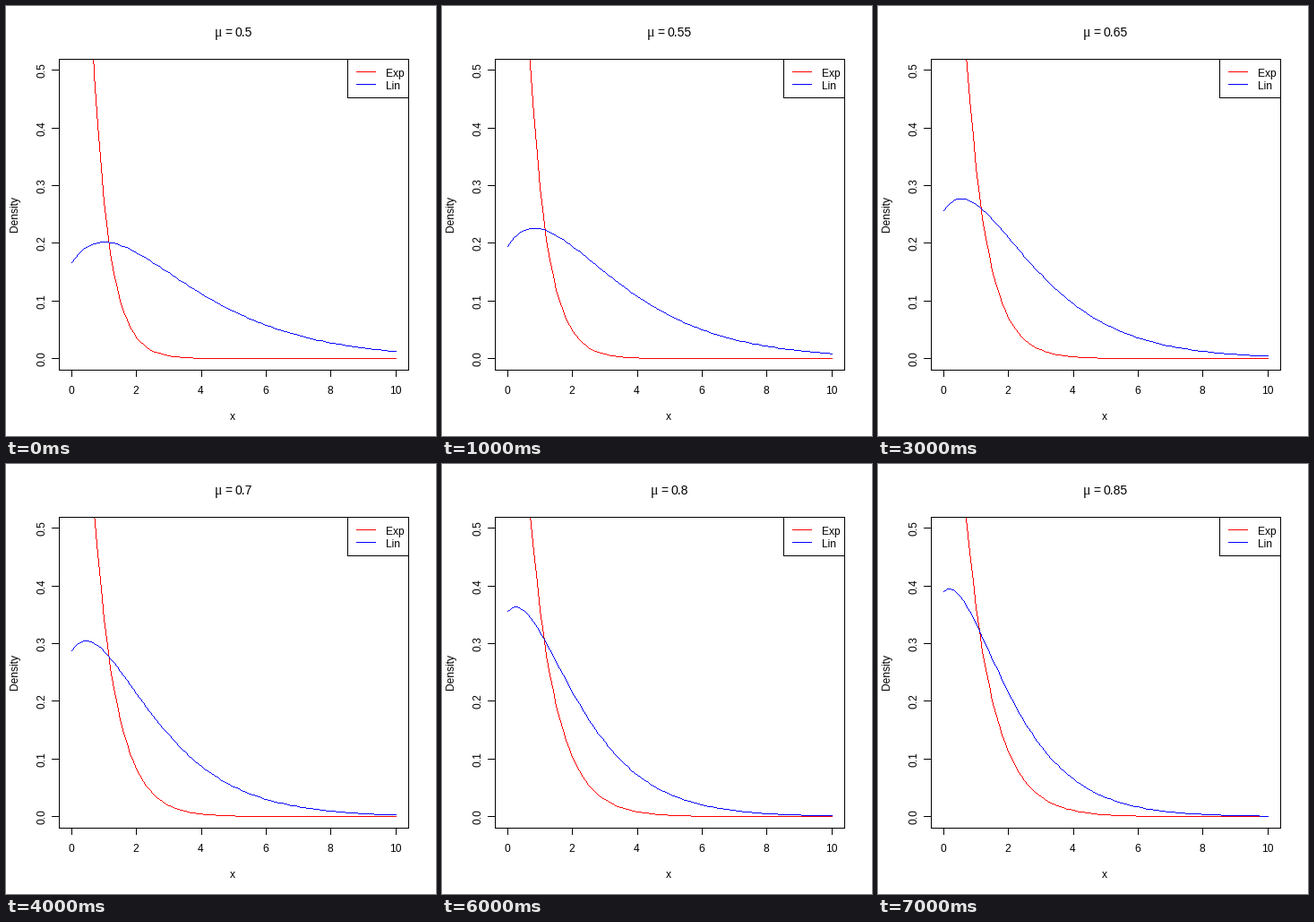
These frames come from a looping animation (480x480 px, 8 s). A matplotlib script:

```python
import numpy as np
import matplotlib.pyplot as plt
from matplotlib.animation import FuncAnimation
from matplotlib.patches import PathPatch, Rectangle
from matplotlib.path import Path

SIZE = 480
LEFT, RIGHT, TOP, BOTTOM = 59, 449, 59, 406
MUS = [0.5 + 0.05 * k for k in range(8)]
X = np.linspace(0, 10, 101)

plt.rcParams["font.family"] = "Liberation Sans"
fig = plt.figure(figsize=(SIZE / 72, SIZE / 72), dpi=72, facecolor="white")
ax = fig.add_axes([0, 0, 1, 1])
ax.set_xlim(0, SIZE)
ax.set_ylim(SIZE, 0)
ax.axis("off")


def px(x):
    return np.floor(73.51 + 36.178 * np.asarray(x))


def py(y):
    return np.floor(393.69 - 643.56 * np.asarray(y))


def pixel_path(xs, ys):
    """Bresenham-style polyline as a path of unit squares."""
    cells = []
    for x0, y0, x1, y1 in zip(xs[:-1], ys[:-1], xs[1:], ys[1:]):
        n = int(max(abs(x1 - x0), abs(y1 - y0))) + 1
        cells.append(np.column_stack([np.linspace(x0, x1, n),
                                      np.linspace(y0, y1, n)]))
    cells = np.unique(np.floor(np.vstack(cells) + 0.5), axis=0)
    cells = cells[cells[:, 1] >= TOP]
    square = np.array([[0, 0], [1, 0], [1, 1], [0, 1], [0, 0]])
    verts = (cells[:, None] + square).reshape(-1, 2)
    codes = [Path.MOVETO] + [Path.LINETO] * 3 + [Path.CLOSEPOLY]
    return Path(verts, np.tile(codes, len(cells)))


def line(xs, ys, color="black", z=3):
    return ax.add_patch(PathPatch(pixel_path(xs, ys), fc=color, ec="none",
                                  lw=0, antialiased=False, snap=False,
                                  zorder=z))


def frame(x0, y0, x1, y1, z):
    line([x0, x1, x1, x0, x0], [y0, y0, y1, y1, y0], z=z)


def label(x, y, s, size=12, ha="center", **kw):
    return ax.text(x, y, s, fontsize=size, ha=ha, va="baseline",
                   color="black", zorder=6, **kw)


def vertical(x, y, s):
    label(x, y, s, rotation=90, rotation_mode="anchor")


def exp_density(x, mu):
    return np.exp(-x / mu) / mu


def lindley_density(x, theta):
    return theta**2 / (1 + theta) * (1 + x) * np.exp(-theta * x)


# Axes
frame(LEFT, TOP, RIGHT, BOTTOM, 3)
for v in range(0, 11, 2):
    line([px(v)] * 2, [BOTTOM, BOTTOM + 7])
    label(px(v) - 0.5, 433, str(v))
for v in np.arange(6) / 10:
    line([LEFT - 8, LEFT], [py(v)] * 2)
    vertical(43, py(v) + 0.5, f"{v:.1f}")
label(253, 462, "x")
vertical(13, 231.5, "Density")

# Legend
ax.add_patch(Rectangle((381.5, 59.5), 68, 43, fc="white", ec="none", zorder=4))
frame(381, TOP, RIGHT, 102, 5)
for y, name, color in [(73, "Exp", "red"), (87, "Lin", "blue")]:
    line([391, 412], [y, y], color, 5)
    label(424, y + 6, name, ha="left")

# Curves and title
curves = [(line(px(X), py(0 * X), "red", 2), exp_density),
          (line(px(X), py(0 * X), "blue", 2.5), lindley_density)]
mu_sign = label(0, 34, "\u03bc", 16, "left", family="Liberation Serif")
equals = label(0, 34, "=", 14, "left")
value = label(0, 34, "", 14, "left")


def update(i):
    mu = MUS[i]
    text = f"{mu:.3g}"
    start = 254.4 - (27.4 + 7.8 * (len(text) - 1)) / 2
    mu_sign.set_x(start)
    equals.set_x(start + 11.2)
    value.set_x(start + 22.3)
    value.set_text(text)
    for curve, density in curves:
        curve.set_path(pixel_path(px(X), py(density(X, mu))))
    return [mu_sign, equals, value] + [c for c, _ in curves]


anim = FuncAnimation(fig, update, frames=len(MUS), interval=1000,
                     repeat=True, repeat_delay=0, blit=False)
plt.show()
```
